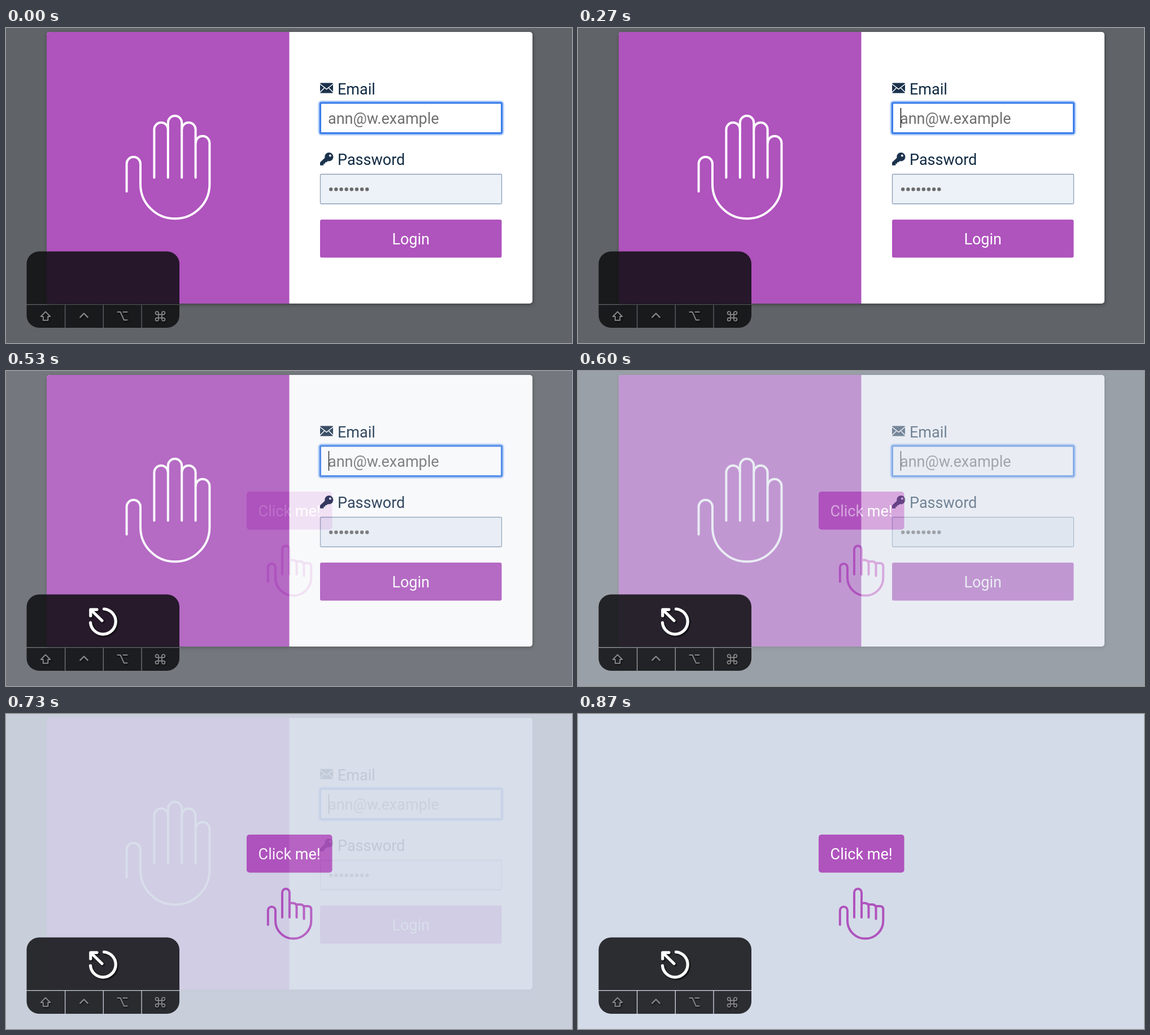
An HTML page that plays this animation: 1002x559 px, repeating every 1.47 s.

```html
<!DOCTYPE html>
<html lang="en">
<head>
<meta charset="utf-8">
<title>Login dialog</title>
<style>
  :root { --purple: #af53bd; --navy: #102a43; --loop: 1470ms; }
  html, body { margin: 0; width: 100%; height: 100%; overflow: hidden; background: #d4dbe8; }
  svg { display: block; width: 1002px; height: 559px; }
  text { font: 400 27px Roboto, sans-serif; fill: var(--navy); }
  .light { fill: #fff; text-anchor: middle; }
  .line { fill: none; stroke-linecap: round; stroke-linejoin: round; }
  .purple { fill: var(--purple); }
  .navy { fill: #1b324c; }
  .card { filter: drop-shadow(1px 2px 3px rgba(0, 0, 0, .35)); }
  .mods { stroke: #87878a; stroke-width: 2; filter: drop-shadow(1px 2px 1px rgba(0, 0, 0, .6)); }
  .esc { stroke: #fff; stroke-width: 5.2; filter: drop-shadow(2px 2px 1px rgba(0, 0, 0, .7)); }

  .dialog, .caret, .esc { animation: var(--loop) step-end infinite; }
  .dialog { animation-name: fade; }
  .caret { animation-name: blink; }
  .esc { animation-name: press; }

  @keyframes fade {
    0% { opacity: 1; }
    36.054% { opacity: .83; }
    40.816% { opacity: .5; }
    45.578% { opacity: .25; }
    49.66% { opacity: .1; }
    54.422% { opacity: .025; }
    59.184%, 100% { opacity: 0; }
  }
  @keyframes blink {
    0% { opacity: 0; }
    18.367%, 100% { opacity: 1; }
  }
  @keyframes press {
    0% { opacity: 0; }
    31.973%, 100% { opacity: 1; }
  }
</style>
</head>
<body>
<svg viewBox="0 0 1002 559">
  <defs>
    <clipPath id="round"><rect x="72" y="7" width="860" height="482" rx="5"/></clipPath>
    <clipPath id="pad"><rect x="36.5" y="396.5" width="270.5" height="135.5" rx="22"/></clipPath>
    <filter id="soft" x="-10%" y="-30%" width="120%" height="160%"><feGaussianBlur stdDeviation="1"/></filter>
  </defs>

  <!-- page -->
  <rect width="1002" height="559" fill="#d4dbe8"/>
  <rect class="purple" x="426" y="214" width="151.5" height="67.5" rx="5"/>
  <text class="light" x="501.7" y="258">Click me!</text>
  <g class="line" stroke="#af53bd" stroke-width="4">
    <path d="M463.8 374V348.5a6.6 6.6 0 0 1 13.2 0V367a31.6 31.6 0 0 0 63.3 0V347q0-6-6-6H527.5"/>
    <path d="M489 361V316.8a6.5 6.5 0 0 1 13 0V361"/>
    <path d="M502 335.5h5.5q7 0 7 7V361M514.5 338h6q7 0 7 7V363.5"/>
  </g>

  <!-- login dialog -->
  <g class="dialog">
    <rect width="1002" height="559" fill="#606468"/>
    <g class="card">
      <g clip-path="url(#round)">
        <rect x="72" y="7" width="860" height="482" fill="#fff"/>
        <rect class="purple" x="72" y="7" width="429.5" height="482"/>
      </g>
    </g>
    <g class="line" stroke="#fff" stroke-width="4">
      <path d="M213.6 290V241a12.2 12.2 0 0 1 24.4 0V277.2a61.2 61.2 0 0 0 122.4 0V204a12.2 12.2 0 0 0-24.6 0"/>
      <path d="M262.4 265.5V180a12.2 12.2 0 0 1 24.4 0"/>
      <path d="M286.8 265.5V168a12.2 12.2 0 0 1 24.4 0V265.5"/>
      <path d="M311.2 180a12.2 12.2 0 0 1 24.4 0V265.5"/>
    </g>

    <rect class="navy" x="556" y="97.5" width="23" height="18" rx="1.5"/>
    <path d="M556 99.5L567.5 108.5L579 99.5M556 114L563.5 106.5M579 114L571.5 106.5" fill="none" stroke="#fff" stroke-width="1.5"/>
    <text x="587" y="117.5">Email</text>
    <rect x="555.5" y="132" width="323" height="55.5" rx="3" fill="none" stroke="#8ab4f8" stroke-width="5" filter="url(#soft)"/>
    <rect x="556.5" y="133" width="321" height="53.5" rx="1.5" fill="#fff" stroke="#3b7eea" stroke-width="3"/>
    <text x="570" y="170" style="fill:#6f6f6f">ann@w.example</text>
    <rect class="caret" x="570.7" y="142" width="1.5" height="35" fill="#111"/>

    <path class="navy" fill-rule="evenodd" d="M571.5 221a7.7 7.7 0 1 1-1.8 15.1L567.5 238.2H565V240.8H562.3V243.7H556V238.6L564.4 230.4A7.7 7.7 0 0 1 571.5 221ZM573.8 224.6a2 2 0 1 0 .1 0Z"/>
    <text x="587" y="243">Password</text>
    <rect x="556.5" y="259.5" width="321" height="52.5" rx="1.5" fill="#edf1f8" stroke="#8ba1b8" stroke-width="1.3"/>
    <path class="line" d="M575.2 286.3H639.8" stroke="#6b6b6b" stroke-width="6.4" stroke-dasharray="0 9.15"/>

    <rect class="purple" x="556" y="340" width="321.5" height="67.5" rx="3"/>
    <text class="light" x="716.7" y="384">Login</text>
  </g>

  <!-- key display -->
  <g clip-path="url(#pad)" fill="#0d0c0f" fill-opacity=".845">
    <rect x="36" y="396" width="272" height="94"/>
    <rect x="36" y="491.3" width="68" height="41"/>
    <rect x="105.3" y="491.3" width="66.4" height="41"/>
    <rect x="173" y="491.3" width="66.4" height="41"/>
    <rect x="240.7" y="491.3" width="67" height="41"/>
  </g>
  <g class="line mods">
    <path d="M70 503.5L78.3 512H74.3V518.7H65.8V512H61.8Z"/>
    <path d="M131.3 513.3L138 506.5L144.7 513.3" stroke-width="2.4"/>
    <path d="M197.5 504H202.5L209 518.3H214.5M207.5 504H214.5"/>
    <path d="M270 508.5h6v6h-6zM270 508.5h-2.7a2.7 2.7 0 1 1 2.7-2.7zM276 508.5v-2.7a2.7 2.7 0 1 1 2.7 2.7zM276 514.5h2.7a2.7 2.7 0 1 1-2.7 2.7zM270 514.5v2.7a2.7 2.7 0 1 1-2.7-2.7z" stroke-width="1.8"/>
  </g>
  <path class="line esc" d="M173.5 422.3A22.4 22.4 0 1 1 149.5 446.5M170 443L150.5 424M149.8 434.5V423.3H161"/>
</svg>
</body>
</html>
```
